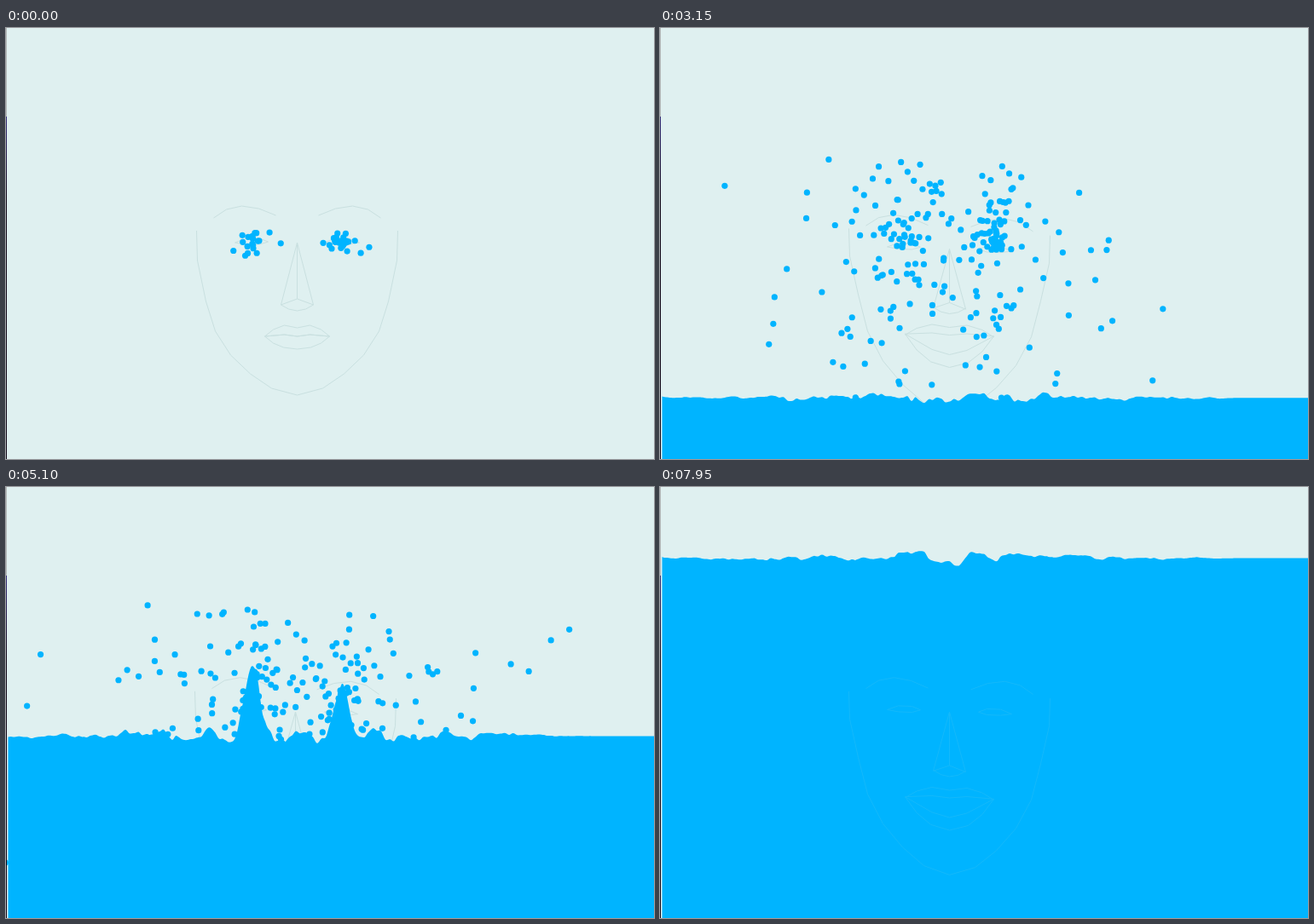
These frames come from a looping animation (760 px wide and 506 px high, 8 s). An HTML page with a canvas:

```html
<!DOCTYPE html>
<html lang="en">
<head>
<meta charset="utf-8">
<title>Rising tears</title>
<style>
  html, body { margin: 0; width: 760px; height: 506px; overflow: hidden; background: #dff0f0; }
  canvas { display: block; }
</style>
</head>
<body>
<canvas id="stage" width="760" height="506"></canvas>
<script>
const ctx = document.getElementById('stage').getContext('2d');
const W = 760, H = 506, LOOP = 8000, STEP = 150, GRAVITY = 230;
const BLUE = '#00b4ff';

const mix = (a, b, k) => a + (b - a) * k;
const part = (t, from, to) => Math.min(1, Math.max(0, (t - from) / (to - from)));
const ease = k => k * k * (3 - 2 * k);
const bell = (x, width) => Math.exp(-((x / width) ** 2));

let seed = 71;
const rand = () => (seed = (seed * 16807) % 2147483647) / 2147483647;

const smileAt = t => ease(part(t, 900, 2400));
const shiftAt = t => -9 * smileAt(t) * (1 - part(t, 2400, 3900));

// Face: half strokes as [distance from the middle, y]; drop(dx, y) is how far a smile lowers a point
const MIDDLE = 341.5;
const openMouth = dx => 3 + 23 * (1 - (dx / 38) ** 2);
const strokes = [
  { half: [[0,431], [30,423], [55,406], [78,384], [96,356], [107,321], [117,273], [118,238]],
    drop: (dx, y) => 6 * part(y, 320, 240) + 0.22 * Math.max(0, y - 320) },
  { half: [[25,220], [45,212], [65,209], [83,213], [98,223]], drop: () => 17 },
  { half: [[34,251], [44,247], [60,247], [73,252], [60,254], [44,254], [34,251]], drop: () => 12 },
  { half: [[0,318], [0,252], [19,325], [0,318]], drop: (dx, y) => y < 300 ? 12 : 9 },
  { half: [[0,332], [10,330], [19,325]], drop: () => 8 },
  { half: [[0,352], [15,349], [28,354], [38,362]], drop: () => 4, wide: 1.37 },
  { half: [[0,362], [15,360], [38,362]], drop: () => 3, wide: 1.37 },
  { half: [[0,362], [15,360], [38,362]], drop: openMouth, wide: 1.37 },
  { half: [[0,377], [16,375], [28,370], [38,362]], drop: openMouth, wide: 1.37 }
];

function drawFace(t, color) {
  const smile = smileAt(t), shift = shiftAt(t);
  ctx.strokeStyle = color;
  ctx.lineWidth = 1;
  ctx.beginPath();
  for (const { half, drop, wide = 1 } of strokes) {
    for (const side of [-1, 1]) {
      half.forEach(([dx, y], i) => {
        const px = MIDDLE - 2 * smile + side * dx * mix(1, wide, smile);
        const py = y + shift + smile * (drop(dx, y) + side * dx * 0.035);
        if (i) ctx.lineTo(px, py); else ctx.moveTo(px, py);
      });
    }
  }
  ctx.stroke();
}

// Drops: ballistic paths from the eyes, thrown harder as time goes on
const drops = [];
const eyes = [{ x: 288, y: 249 }, { x: 395, y: 252 }];

for (let born = -330; born < 7200; born += 6.8) {
  const eye = eyes[rand() < 0.5 ? 0 : 1];
  const force = ease(part(born, 800, 2700));
  drops.push({
    born,
    x: eye.x + (rand() - 0.5) * 16,
    y: eye.y + 12 * smileAt(born) + shiftAt(born) + (rand() - 0.5) * 8,
    vx: (rand() * 2 - 1) * rand() * mix(130, 270, force),
    vy: mix(mix(-75, -240, force), mix(40, 0, force), rand())
  });
}

function drawDrops(t) {
  ctx.fillStyle = BLUE;
  for (const d of drops) {
    const age = (t - d.born) / 1000;
    if (age < 0) break;
    const y = d.y + d.vy * age + GRAVITY / 2 * age * age;
    if (y > H + 4) continue;
    ctx.beginPath();
    ctx.arc(d.x + d.vx * age, y, 3.6, 0, 7);
    ctx.fill();
  }
}

// Water: a rising level, choppy noise and a swell that leaves each eye both ways
const levels = [[2165, 506], [2400, 489], [3900, 379.5], [5100, 292.5], [6150, 212], [7950, 83.5]];
const SWELL = 5100;

function levelAt(t) {
  const i = levels.findIndex(([time]) => time >= t);
  const [t0, y0] = levels[i - 1], [t1, y1] = levels[i];
  return mix(y0, y1, part(t, t0, t1));
}

const grid = Array.from({ length: 30 }, () => Array.from({ length: 170 }, () => rand() * 2 - 1));

function noise(x, t) {
  const i = Math.floor(x), j = Math.floor(t), k = ease(x - i);
  const row = r => mix(grid[r][i], grid[r][i + 1], k);
  return mix(row(j), row(j + 1), t - j);
}

function swellAt(x, t) {
  const away = Math.max(0, t - SWELL) * 0.033;
  const size = bell(t - SWELL, t < SWELL ? 400 : 1900);
  return size * eyes.reduce((sum, eye, i) =>
    sum + (i ? 25 : 38) * (bell(x - eye.x + away, 12) + bell(x - eye.x - away, 12)), 0);
}

function waterPath(t) {
  const level = levelAt(t);
  const chop = mix(4, 12, part(t, 2200, 3900)) * mix(1, 0.6, part(t, 3900, LOOP));
  const path = new Path2D();
  path.moveTo(2.5, H);
  for (let x = 2.5; x <= W + 2; x += 1.5) {
    const height = chop * bell(x - 325, 190) + 1.5 * part(x, 680, 600);
    const wave = noise(x / 14, t / 300) + 0.45 * noise(x / 5, t / 300);
    path.lineTo(x, level + height * wave - swellAt(x, t));
  }
  path.lineTo(W + 2, H);
  path.closePath();
  return path;
}

const edge = ctx.createLinearGradient(0, 104, 0, 200);
edge.addColorStop(0, '#38327c');
edge.addColorStop(1, '#160c1c');

function draw(t) {
  ctx.fillStyle = '#dff0f0';
  ctx.fillRect(0, 0, W, H);
  drawFace(t, '#c9e0e0');
  drawDrops(t);
  if (t > levels[0][0]) {
    const water = waterPath(t);
    ctx.fillStyle = BLUE;
    ctx.fill(water);
    ctx.save();
    ctx.clip(water);
    ctx.globalAlpha = part(t, SWELL, 6150);
    drawFace(t, '#14b9fb');
    ctx.restore();
  }
  ctx.fillStyle = '#b4b8b8';
  ctx.fillRect(0, 0, 1, 104);
  ctx.fillStyle = edge;
  ctx.fillRect(0, 104, 1, H);
}

function tick(now) {
  draw(Math.floor(now % LOOP / STEP) * STEP);
  requestAnimationFrame(tick);
}
requestAnimationFrame(tick);
</script>
</body>
</html>
```
